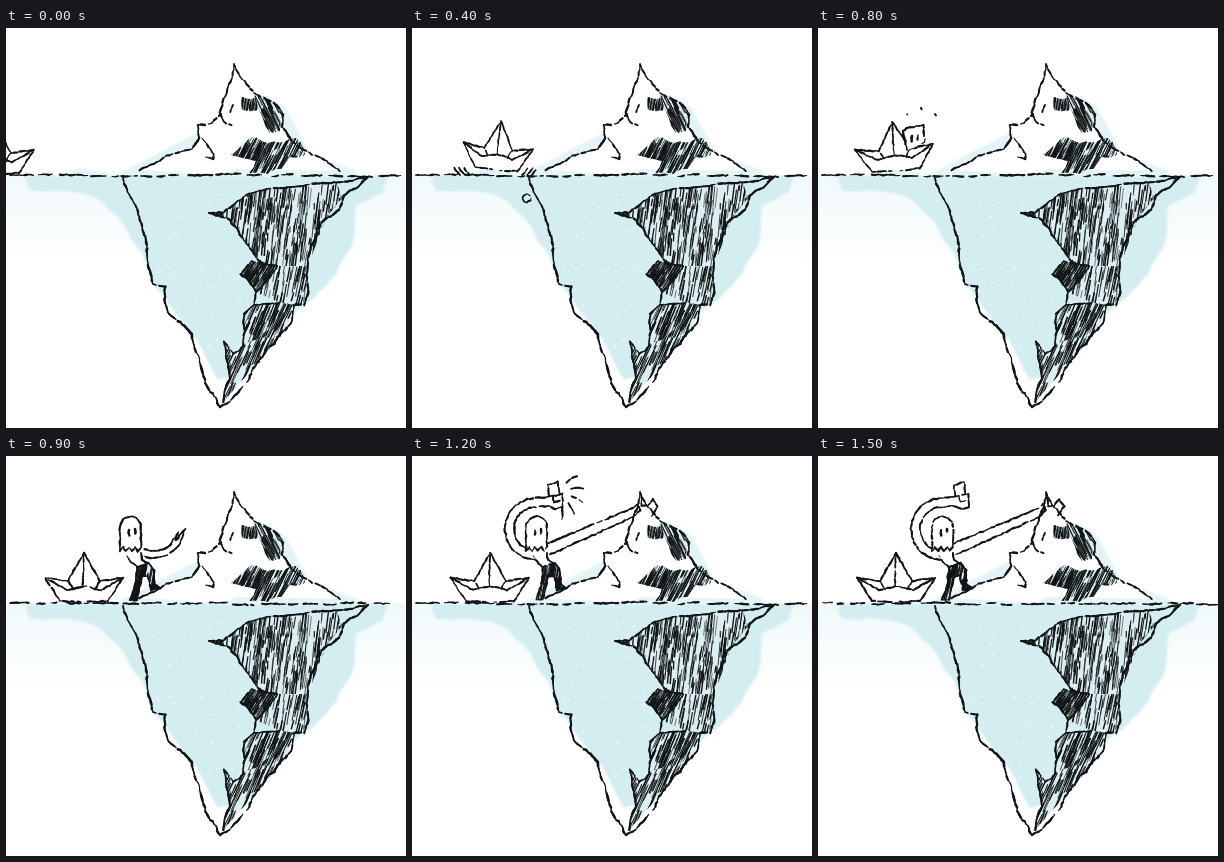
Write an HTML page with a canvas that moves like this. It is 400 px wide and 400 px high and loops after 1.6 s.

```html
<!DOCTYPE html>
<html lang="en">
<head>
<meta charset="utf-8">
<title>Iceberg selfie</title>
<style>
html, body { margin: 0; width: 100%; height: 100%; overflow: hidden; background: #fff; }
canvas { display: block; width: 400px; height: 400px; }
</style>
</head>
<body>
<canvas id="stage" width="400" height="400"></canvas>
<script>
const INK = '#111415', TINT = '#d4edf1';
const STEP = 100, STEPS = 16, SEA = 147;
const stage = document.getElementById('stage').getContext('2d');
let ctx = stage, seed = 1;

function rand() {
  seed = (seed * 16807) % 2147483647;
  return seed / 2147483647;
}
const jitter = amount => (rand() - 0.5) * 2 * amount;
const lerp = (a, b, t) => a + (b - a) * t;
const pts = path => typeof path === 'string' ? path.split(' ').map(p => p.split(',').map(Number)) : path;

// Breaks a few key points into a rocky edge by midpoint displacement.
function crag(path, rough = 0.1) {
  const split = ([ax, ay], [bx, by]) => {
    if (Math.hypot(bx - ax, by - ay) < 9) return [[bx, by]];
    const k = jitter(rough);
    const mid = [(ax + bx) / 2 + k * (by - ay), (ay + by) / 2 - k * (bx - ax)];
    return [...split([ax, ay], mid), ...split(mid, [bx, by])];
  };
  const p = pts(path);
  return p.slice(1).reduce((out, q, i) => [...out, ...split(p[i], q)], [p[0]]);
}

// Points on a circle, angles in degrees.
function arc(cx, cy, r, from, to) {
  return Array.from({ length: 13 }, (_, i) => {
    const a = lerp(from, to, i / 12) * Math.PI / 180;
    return [cx + r * Math.cos(a), cy + r * Math.sin(a)];
  });
}

// Rough line: short wobbly pieces of changing width, with occasional gaps.
function pencil(path, width = 1.7, gap = 0.04) {
  const p = pts(path);
  ctx.strokeStyle = INK;
  ctx.lineCap = 'round';
  let [x, y] = p[0];
  for (let i = 1; i < p.length; i++) {
    const [ax, ay] = p[i - 1], [bx, by] = p[i];
    const n = Math.max(1, Math.round(Math.hypot(bx - ax, by - ay) / 3));
    for (let k = 1; k <= n; k++) {
      const nx = lerp(ax, bx, k / n) + jitter(0.5), ny = lerp(ay, by, k / n) + jitter(0.5);
      ctx.lineWidth = width * (0.6 + rand() * 0.8);
      if (rand() >= gap) {
        ctx.beginPath();
        ctx.moveTo(x, y);
        ctx.lineTo(nx, ny);
        ctx.stroke();
      }
      [x, y] = [nx, ny];
    }
  }
}

function fill(path, color) {
  ctx.beginPath();
  pts(path).forEach(p => ctx.lineTo(...p));
  ctx.closePath();
  ctx.fillStyle = color;
  ctx.fill();
}

function shape(path, width) {
  fill(path, '#fff');
  pencil(path, width);
}

// Pencil shading inside a shape; cover is ink per area, bias crowds it to the left.
function hatch(path, cover, lean, bias = 1) {
  const p = pts(path), xs = p.map(q => q[0]), ys = p.map(q => q[1]);
  const l = Math.min(...xs), t = Math.min(...ys);
  const w = Math.max(...xs) - l, h = Math.max(...ys) - t;
  ctx.save();
  fill(p, '#dceef1');
  ctx.clip();
  ctx.strokeStyle = INK;
  for (let i = 0; i < w * h * cover / 15; i++) {
    const x = l + w * rand() ** bias, y = t + h * rand(), len = 6 + rand() * 24;
    ctx.lineWidth = 0.5 + rand();
    ctx.beginPath();
    ctx.moveTo(x + lean * len / 2, y - len / 2);
    ctx.lineTo(x - lean * len / 2 + jitter(1), y + len / 2);
    ctx.stroke();
  }
  ctx.restore();
}

function drawWater() {
  const sea = ctx.createLinearGradient(0, SEA, 0, 240);
  sea.addColorStop(0, 'rgba(212,237,241,.35)');
  sea.addColorStop(1, 'rgba(212,237,241,0)');
  ctx.fillStyle = sea;
  ctx.fillRect(0, SEA, 400, 93);
  ctx.filter = 'blur(1px)';
  fill(crag('20,148 24,163 90,170 118,197 146,255 190,310 212,352 240,346 310,268 345,220 350,178 376,165 382,148', 0.06), TINT);
  fill('262,68 280,80 304,126 350,142 352,148 45,148 75,140 110,147', '#e4f4f6');
  ctx.filter = 'none';
}

function drawTip() {
  const left = crag('228,36 222,58 214,84'), ledge = crag('215,86 206,95 192,97 193,110 186,121');
  const slope = crag('186,121 160,128 134,142', 0.05);
  const right = crag('228,36 243,59 268,75 277,86 276,99 298,122');
  const foot = crag('298,122 316,130 334,143', 0.06);
  fill([...left, ...ledge, ...slope, [215, 147], [230, 141], ...foot.slice().reverse(), ...right.slice().reverse()], '#fff');
  hatch(crag('246,66 268,75 277,86 274,103 264,105 257,90'), 0.8, -0.5);
  hatch(crag('235,69 250,70 252,82 236,82'), 2.2, 0.2);
  hatch(crag('225,127 234,119 246,109 290,110 299,127 284,129 262,146 243,145 250,133', 0.15), 1.1, 0.5, 1.3);
  pencil(left, 1.7, 0.1);
  pencil(ledge, 1.8, 0.1);
  pencil(slope, 1.6, 0.25);
  pencil(right, 1.8, 0.1);
  pencil(foot, 1.6, 0.15);
  pencil('214,86 218,94 228,98');
  pencil('196,110 208,126 207,131 200,129');
  pencil('227,77 224,84');
}

function drawBase() {
  const left = crag('117,150 132,182 141,218 147,256 159,259 162,284 186,306 203,362 214,379', 0.07);
  const right = crag('214,379 231,366 253,333 268,316 281,300 288,277 298,277 302,238 320,190 333,182 338,168 362,149');
  const ridge = crag('203,185 218,184 240,167 268,160 320,155 362,149', 0.04);
  const belly = crag('203,185 222,190 238,212 254,234 271,238', 0.05);
  const gem = crag('246,233 271,238 262,252 250,264 235,246 246,233', 0.06);
  const spur = crag('250,264 248,277 238,286 237,318 227,326 218,314 224,348 217,374', 0.06);
  // grain of the wash
  ctx.fillStyle = '#fff';
  for (let i = 0; i < 160; i++) ctx.fillRect(145 + rand() * 90, 165 + rand() * 160, 1 + rand() * 2, 0.7);
  hatch([...ridge.slice(0, -6), [336, 170], [320, 190], [302, 238], ...belly.slice().reverse()], 0.62, 0.12, 1.5);
  hatch('252,265 271,238 302,238 298,277 288,277 280,292 272,274', 0.4, 0.2);
  hatch(gem, 1.5, 0.6);
  hatch([...spur.slice(3), [253, 333], [281, 300], [288, 277], [272, 274]], 0.55, 0.45);
  hatch(crag('238,286 248,277 273,276 262,302 238,316'), 0.8, 0.4);
  pencil(left, 2);
  pencil(right, 1.9);
  [ridge, belly, gem, spur].forEach(edge => pencil(edge, 1.7));
  pencil('248,277 273,275');
}

const berg = document.createElement('canvas');
berg.width = berg.height = 400;
ctx = berg.getContext('2d');
seed = 4242;
drawWater();
drawBase();
drawTip();
ctx = stage;

function drawSurface() {
  for (let x = 4 + rand() * 6; x < 385;) {
    const end = x + 5 + rand() * 24, y = SEA + 0.5 + jitter(1);
    pencil([[x, y], [end, y + jitter(0.8)]], 1.7);
    x = end + 3 + rand() * 6;
  }
}

// Sails in at a steady speed; the bump lifts, tips and fades away.
function drawBoat(step, peek) {
  const bump = Math.exp(-Math.abs(step - 4));
  ctx.save();
  ctx.translate(78 + Math.min(38 * step - 89, 6 * bump), SEA - 4 * bump - 3 * peek);
  ctx.rotate(0.1 * bump - 0.08 * peek);
  ctx.scale(1 - 0.11 * bump, 1);
  for (const side of [-1, 1]) {
    ctx.save();
    ctx.scale(side, 1);
    fill('0,-50 16,-22 39,-25 24,-2 0,-2', '#fff');
    pencil('0,-50 16,-22 39,-25 24,-2');
    pencil('39,-25 17,-13 0,-17');
    pencil('16,-22 11,-14');
    pencil('24,-2 4,-1');
    ctx.restore();
  }
  pencil('0,-50 -1,-18');
  ctx.restore();
}

function drawSplash() {
  for (const side of [-1, 1])
    for (let i = 0; i < 3; i++) {
      const x = 84 + side * (26 + i * 5);
      pencil([[x, SEA], [x + side * 6, SEA - 7]], 1.5);
    }
  pencil(arc(115, 170, 4, -90, 270), 1.5);
}

function drawEyes(x, y) {
  for (const dx of [0, 6]) pencil([[x + dx, y - dx / 6], [x + dx, y + 5 - dx / 6]], 2);
}

function drawPeek(peek) {
  const drop = 12 * (1 - peek);
  ctx.save();
  ctx.translate(0, drop);
  shape('89,122 85,103 89,100 105,97 107,114 98,119');
  drawEyes(94, 108);
  ctx.restore();
  for (let i = 0; i < 3; i++) pencil([[89 + i * 14, 86 - 6 * (i % 2)], [90 + i * 14, 87 - 6 * (i % 2)]]);
}

function drawHead() {
  const beard = Array.from({ length: 8 }, (_, i) => [135 - i * 3, 91 + 4 * (i % 2)]);
  shape([...arc(124.5, 71, 10.5, 180, 360), ...beard, [114, 71]]);
  drawEyes(123, 74);
}

function drawBody() {
  fill('118,96 135,94 142,108 131,112', '#fff');
  pencil('121,100 125,106 131,111');
  pencil('135,97 136,104 142,107');
  const legs = '131,111 143,107 148,114 149,128 154,132 145,134 142,120 136,121 131,144 124,144 129,130 131,111';
  hatch(legs, 2, 0.2);
  pencil(legs);
}

function drawPhoneArm() {
  const outer = [...arc(124, 73, 31, 90, 270), [136, 41]];
  const inner = [...arc(124, 73, 22, 115, 270), [136, 50]];
  fill([...outer, ...inner.slice().reverse()], '#fff');
  pencil(outer);
  pencil(inner);
  shape('137,41 136,29 146,26 148,39', 1.6);
  shape('135,41 150,38 151,51 143,53 136,50');
  pencil('141,40 142,46 148,45');
}

function drawFreeArm() {
  pencil(arc(148, 72, 30, 110, 30));
  pencil(arc(148, 70, 25, 112, 48));
  pencil('164,89 172,76 170,84 179,73 174,87');
}

function drawLongArm(reach) {
  const x = lerp(160, 221, reach), y = lerp(78, 52, reach);
  fill([[134, 88], [x, y], [x, y + 9], [137, 99]], '#fff');
  pencil([[134, 88], [x, y]]);
  pencil([[137, 99], [x, y + 9]]);
  pencil([[x, y], [x + 4, y - 4], [x + 7, y + 2], [x, y + 9]]);
  if (reach === 1) pencil('229,39 230,50 236,50 241,43 246,50 240,60');
}

function drawFlash() {
  for (let i = 0; i < 5; i++) {
    const a = -1.1 + i * 0.55, ray = r => [146 + r * Math.cos(a + r / 80), 38 + r * Math.sin(a + r / 80)];
    pencil([14, 18, 22, 26].map(ray));
  }
}

function draw(step) {
  const peek = step < 9 ? Math.max(0, 1 - 0.7 * Math.abs(step - 8)) : 0;
  ctx.fillStyle = '#fff';
  ctx.fillRect(0, 0, 400, 400);
  ctx.drawImage(berg, 0, 0);
  seed = 97 + (step % 4) * 5381;
  drawSurface();
  drawBoat(step, peek);
  if (step === 4) drawSplash();
  if (peek) drawPeek(peek);
  if (step < 9) return;
  if (step < 11) drawFreeArm();
  else drawLongArm(Math.min(1, (step - 10) / 2));
  drawBody();
  if (step > 9) drawPhoneArm();
  drawHead();
  if (step === 12 || step === 13) drawFlash();
}

let shown = -1;
function tick(now) {
  const step = Math.floor(now / STEP) % STEPS;
  if (step !== shown) draw(shown = step);
  requestAnimationFrame(tick);
}
tick(0);
</script>
</body>
</html>
```
